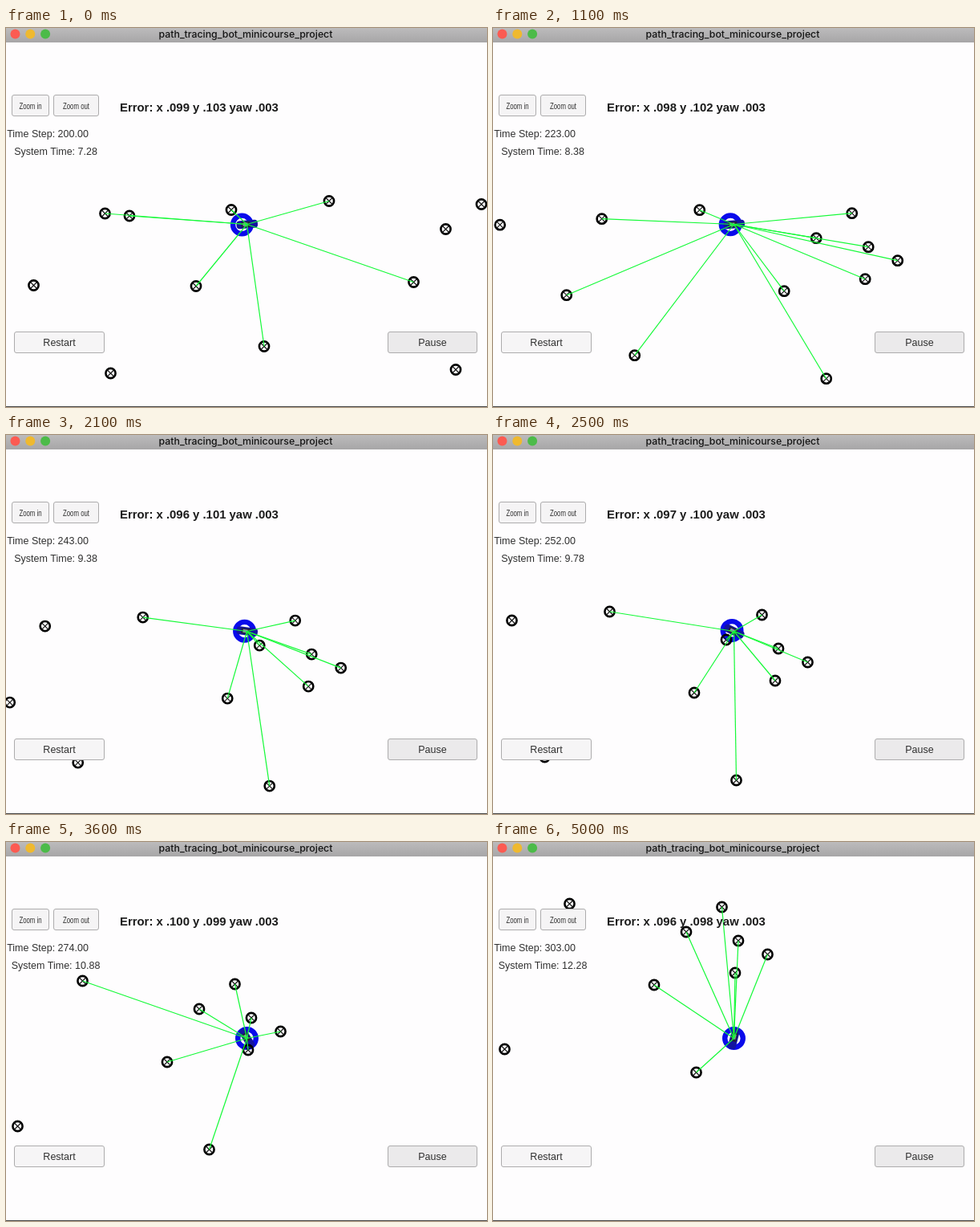
Write an HTML page with a canvas that moves like this. It is 600 by 472 pixels and loops after 5100 ms.

```html
<!DOCTYPE html>
<html lang="en">
<head>
<meta charset="utf-8">
<title>Vehicle localisation</title>
<style>
  html, body { margin: 0; width: 100%; height: 100%; overflow: hidden; background: #fefdfe; }
  canvas { display: block; }
</style>
</head>
<body>
<canvas id="stage" width="600" height="472"></canvas>
<script>
const ctx = document.getElementById('stage').getContext('2d');
const LOOP = 5100, TICK = 100, STEP_MS = 42, RANGE = 227;
const CAR = { x: 300.5, y: 244.5 };
const SANS = '"Liberation Sans", Arial, sans-serif';
const INK = '#303030';

// Waypoints of the drive: ms, x, y
const ROUTE = [
  [0, 0, 0], [600, 89.5, -6.5], [1600, 193, -13.5], [2500, 257.5, -4.5],
  [3600, 307.5, 42.5], [4300, 319, 94.5], [5000, 307.5, 138.5]
];

const LANDMARKS = [
  [123.5, 231], [154, 234], [281, 226.5], [403, 215.5], [593, 219.5],
  [548.5, 250.5], [508.5, 316.5], [322, 396.5], [237, 321.5], [34.5, 320.5],
  [130.5, 430], [561, 425.5], [613.5, 261.5], [650, 278.5], [609.5, 301.5]
];

function slope(axis, i) {
  const a = ROUTE[Math.max(i - 1, 0)], b = ROUTE[Math.min(i + 1, ROUTE.length - 1)];
  return (b[axis] - a[axis]) / (b[0] - a[0]);
}

// Smooth curve through the waypoints
function carAt(ms) {
  let i = 0;
  while (i < ROUTE.length - 2 && ms >= ROUTE[i + 1][0]) i++;
  const a = ROUTE[i], b = ROUTE[i + 1], span = b[0] - a[0];
  const u = (ms - a[0]) / span, v = 1 - u;
  const along = axis => a[axis] * v * v * (1 + 2 * u) + b[axis] * u * u * (3 - 2 * u)
    + span * u * v * (slope(axis, i) * v - slope(axis, i + 1) * u);
  return { x: along(1), y: along(2) };
}

function disc(x, y, r, color) {
  ctx.fillStyle = color;
  ctx.beginPath();
  ctx.arc(x, y, r, 0, 7);
  ctx.fill();
}

function ring(x, y, r, width, color) {
  ctx.strokeStyle = color;
  ctx.lineWidth = width;
  ctx.beginPath();
  ctx.arc(x, y, r, 0, 7);
  ctx.stroke();
}

function line(x1, y1, x2, y2, width, color) {
  ctx.strokeStyle = color;
  ctx.lineWidth = width;
  ctx.beginPath();
  ctx.moveTo(x1, y1);
  ctx.lineTo(x2, y2);
  ctx.stroke();
}

function text(label, x, y, font, align = 'center', color = INK, squeeze = 1) {
  ctx.save();
  ctx.translate(x, y);
  ctx.scale(squeeze, 1);
  ctx.font = font;
  ctx.textAlign = align;
  ctx.fillStyle = color;
  ctx.fillText(label, 0, 0);
  ctx.restore();
}

function button(label, x, y, w, h, fill, size, squeeze) {
  ctx.beginPath();
  ctx.roundRect(x + .5, y + .5, w, h, 2.5);
  ctx.fillStyle = fill;
  ctx.fill();
  ctx.strokeStyle = '#adacad';
  ctx.lineWidth = 1;
  ctx.stroke();
  text(label, x + w / 2 + .5, y + h / 2 + 5, size + 'px ' + SANS, 'center', INK, squeeze);
}

function drawCar(heading) {
  ctx.save();
  ctx.translate(CAR.x, CAR.y);
  ctx.rotate(heading);
  ctx.fillStyle = '#1414a0';
  ctx.beginPath();
  ctx.roundRect(-13, -5, 26.5, 10, 4);
  ctx.fill();
  ctx.fillStyle = '#20203c';
  ctx.fillRect(-7, -3.5, 11, 7);
  ctx.fillStyle = '#8f95a8';
  ctx.fillRect(-5, -2, 6, 4);
  ctx.restore();
}

function drawLandmark(x, y) {
  ring(x, y, 6.1, 2.6, '#000');
  line(x - 4, y - 4, x + 4, y + 4, 1.1, '#111');
  line(x - 4, y + 4, x + 4, y - 4, 1.1, '#111');
}

function drawWorld(ms, tick) {
  const car = carAt(ms), before = carAt(ms - STEP_MS), after = carAt(ms + STEP_MS);
  const marks = LANDMARKS.map(([x, y]) => [x - car.x, y - car.y]);

  // The estimate sometimes trails the car by one step.
  const lag = tick % 7 % 4 === 0 ? 1 : 0;
  ring(CAR.x + lag * (before.x - car.x), CAR.y + lag * (before.y - car.y), 11.3, 6.4, '#0a0aeb');
  drawCar(Math.atan2(after.y - before.y, after.x - before.x));

  for (const [x, y] of marks) drawLandmark(x, y);
  for (const [x, y] of marks) {
    if (Math.hypot(x - CAR.x, y - CAR.y) < RANGE) line(CAR.x, CAR.y, x, y, 1.2, '#14fa37');
  }
}

function drawPanel(seconds) {
  const decimals = value => value.toFixed(3).slice(1);
  const errorX = decimals(.0978 + .0018 * Math.cos(1.9 * (seconds - .3)));
  const errorY = decimals(.103 - .00108 * seconds);
  const step = Math.round(199.9 + 20.7 * seconds);

  button('Zoom in', 7, 83, 46, 26, '#f5f4f5', 11.5, .68);
  button('Zoom out', 59, 83, 56, 26, '#f5f4f5', 11.5, .68);
  button('Restart', 10, 378, 112, 26, '#f6f5f6', 12.5);
  button('Pause', 476, 378, 111, 26, '#ebeaeb', 12.5);
  text(`Error: x ${errorX} y ${errorY} yaw .003`, 142, 104, 'bold 14.9px ' + SANS, 'left', '#1c1c1c');
  text(`Time Step: ${step.toFixed(2)}`, 52, 136, '12.5px ' + SANS);
  text(`System Time: ${(7.28 + seconds).toFixed(2)}`, 62, 158, '12.5px ' + SANS);
}

function drawWindow() {
  const bar = ctx.createLinearGradient(0, 0, 0, 18);
  bar.addColorStop(0, '#bcbbbc');
  bar.addColorStop(1, '#a7a6a7');
  ctx.fillStyle = bar;
  ctx.fillRect(0, 0, 600, 18);
  ['#fc5b52', '#efb92f', '#4cbb49'].forEach((color, i) => disc(11.5 + 18.8 * i, 7.5, 6, color));
  text('path_tracing_bot_minicourse_project', 299, 12, '500 12.3px Inter, sans-serif', 'center', '#151515');
  ctx.fillStyle = '#484848';
  ctx.fillRect(0, 471, 600, 1);
}

function draw(now) {
  const tick = Math.floor(now % LOOP / TICK), ms = tick * TICK;
  ctx.fillStyle = '#fefdfe';
  ctx.fillRect(0, 0, 600, 472);
  drawWorld(ms, tick);
  drawPanel(ms / 1000);
  drawWindow();
}

const began = performance.now();
function frame() {
  draw(performance.now() - began);
  requestAnimationFrame(frame);
}
frame();
</script>
</body>
</html>
```
